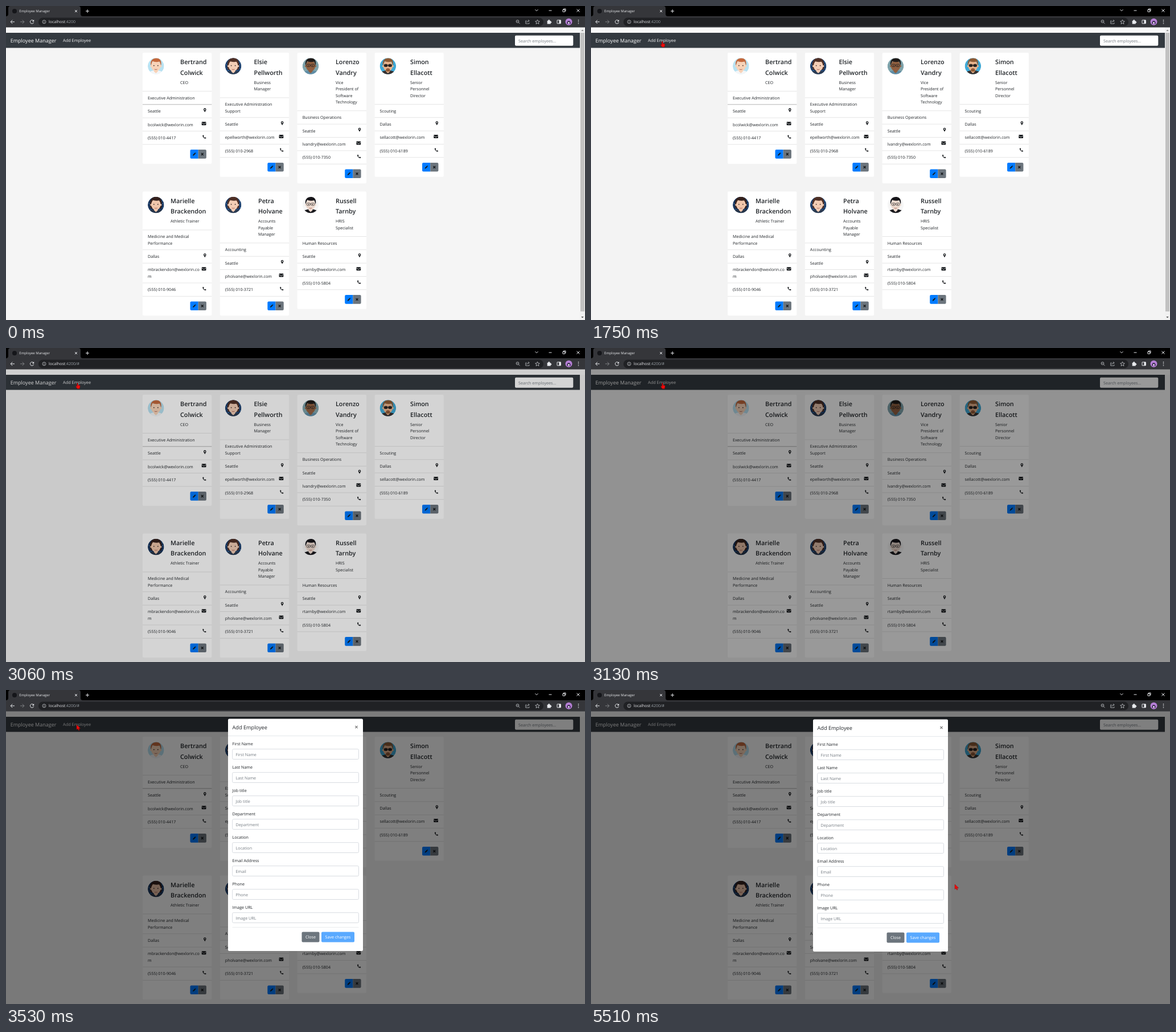
Recreate the animation shown at these times as an HTML page. Size 1017 px wide and 551 px high, loop 6.33 s.

```html
<!DOCTYPE html>
<html lang="en">
<head>
<meta charset="utf-8">
<title>Employee Manager</title>
<style>
  html, body { margin: 0; width: 100%; height: 100%; overflow: hidden; background: #f3f3f3; }
  svg { display: block; width: 1017px; height: 551px; }
  text { font: 400 7.17px "Open Sans", "Noto Sans", sans-serif; fill: #212529; text-rendering: geometricPrecision; white-space: pre; }
  text.name { font-size: 10.8px; font-weight: 600; }
  text.title { font-size: 9.2px; font-weight: 500; }
  text.brand { font-size: 9px; fill: #fff; }
  text.nav { font-size: 7.35px; fill: #f4f4f5; }
  text.hint { fill: #757c83; }
  text.btn { fill: #fff; text-anchor: middle; }
  text.tab { font-size: 6px; fill: #e8eaed; }
  text.url { font-size: 6.97px; fill: #e8eaed; }
  .dim { fill: #9aa0a6; }
  .line { fill: none; stroke: #e8eaed; stroke-width: 1; }
  .thin { stroke: #c4c7cb; stroke-width: .8; }
</style>
</head>
<body>
<svg id="stage" viewBox="0 0 1017 551"></svg>
<script>
const LOOP = 6330;

const rect = (x, y, w, h, fill, r = 0, more = '') =>
  `<rect x="${x}" y="${y}" width="${w}" height="${h}" fill="${fill}" rx="${r}" ${more}/>`;
const text = (x, y, s, cls = '') => `<text x="${x}" y="${y}" class="${cls}">${s}</text>`;
const path = (d, fill, more = '') => `<path d="${d}" fill="${fill}" ${more}/>`;
const line = (d, cls = '', more = '') => `<path class="line ${cls}" d="${d}" ${more}/>`;
const dot = (x, y, r, fill) => `<circle cx="${x}" cy="${y}" r="${r}" fill="${fill}"/>`;
const ring = (x, y, r) => `<circle class="line thin" cx="${x}" cy="${y}" r="${r}"/>`;
const group = (x, y, body, id = '') => `<g ${id && `id="${id}"`} transform="translate(${x} ${y})">${body}</g>`;

// Avatars, centred on 0,0 with radius 14.3
const looks = {
  red: { bg: '#b8e2f2', skin: '#f8d3b8', hair: '#c4683c', shirt: '#f4f6f8' },
  star: { bg: '#1d3f6c', skin: '#f3cdb5', hair: '#4f3026', shirt: '#2b3b52', long: 1, stars: 1 },
  night: { bg: '#17345c', skin: '#f0c6ab', hair: '#35211d', shirt: '#26354a', long: 1, stars: 1 },
  glasses: { bg: '#7ea3ab', skin: '#8f5f3f', hair: '#1f1a18', shirt: '#5f8da6', rim: '#222' },
  shades: { bg: '#3fa9d6', skin: '#e9b48d', hair: '#8d5a34', shirt: '#35302f', rim: '#26211f', lens: '#26211f', beard: 1 },
  dark: { bg: '#f6f6f6', skin: '#eedbd0', hair: '#17161a', shirt: '#1b1b1f', rim: '#333' }
};

function avatar(kind) {
  const a = looks[kind];
  let back = dot(0, 0, 14.3, a.bg), s = '';
  if (a.stars) for (let i = 0; i < 16; i++) {
    const ang = i * 2.4, r = 10.5 + (i % 3) * 1.4;
    back += dot((Math.cos(ang) * r).toFixed(1), (Math.sin(ang) * r).toFixed(1), .7, '#4d94d1');
  }
  if (a.long) s += path('M-7.6 5C-9.4-3-8.4-11 0-11.5 8.4-11 9.4-3 7.6 5Z', a.hair);
  s += path('M-12 10C-8 6.8-4 6.5-3 6H3C4 6.5 8 6.8 12 10V13H-12Z', a.shirt);
  s += path('M-2.7 4H2.7V7.5L0 10-2.7 7.5Z', a.skin);
  s += `<ellipse cx="0" cy="-.5" rx="6.6" ry="7.8" fill="${a.skin}"/>`;
  s += dot(-6.7, 0, 1.4, a.skin) + dot(6.7, 0, 1.4, a.skin);
  s += path('M-7.2-1C-8.5-8-4-11.5 1-11.2 6-11 8.3-7 7.2-1 6-3 6.2-5 5-6.4 1-5.4-3-6-4.6-7-6-5-6-3-7.2-1Z', a.hair);
  if (a.beard) s += path('M-2.8 5.2Q-2.8 3 0 3T2.8 5.2V7Q0 8.6-2.8 7Z', a.hair);
  if (a.rim) {
    for (const x of [-5.4, .6]) s += rect(x, -2.6, 4.8, 3.4, a.lens || 'none', 1.3, `stroke="${a.rim}" stroke-width=".6"`);
    s += path('M-.6-1.5H.6', 'none', `stroke="${a.rim}" stroke-width=".6"`);
  }
  if (!a.lens) s += dot(-2.8, -.8, .7, '#2a2222') + dot(2.8, -.8, .7, '#2a2222');
  s += path('M-1.9 4.4Q0 5.4 1.9 4.4', 'none', 'stroke="#a4584c" stroke-width=".7"');
  return `<g clip-path="url(#round)">${back}<g transform="scale(1.25)">${s}</g></g>`;
}

const INK = '#16191c';
const pin = path('M0 3.7C-.6 1.7-2.3.6-2.3-1.2A2.3 2.3 0 0 1 2.3-1.2C2.3.6.6 1.7 0 3.7ZM0-2.2A1 1 0 1 0 .01-2.2Z', INK, 'fill-rule="evenodd"');
const mail = rect(-3.9, -3, 7.8, 6, INK, .8) + path('M-3.9-1.5L0 1.1 3.9-1.5', 'none', 'stroke="#fff" stroke-width=".7"');
const phone = path('M-3-2.6L-1.6-3.2-.6-1-1.5-.2C-1 .8-.5 1.2.3 1.6L1.1.7 3.2 1.6 2.7 3C-.5 3.4-3.3.5-3 -2.6Z', INK);
const pencil = path('M-2.7 2.7L-2.2.8 1-2.4 2.4-1-.8 2.2ZM1.3-2.7L1.8-3.1 3.1-1.8 2.7-1.3Z', INK);
const cross = path('M-1.9-1.9L1.9 1.9M1.9-1.9L-1.9 1.9', 'none', `stroke="${INK}" stroke-width="1.4"`);
const buttons =
  path('M14.2 0H2Q0 0 0 2V13.6Q0 15.6 2 15.6H14.2Z', '#007bff') +
  path('M14.2 0H26.4Q28.4 0 28.4 2V13.6Q28.4 15.6 26.4 15.6H14.2Z', '#6c757d') +
  group(7.2, 7.9, pencil) + group(21.3, 7.9, cross);

function card(col, top, look, name, nameX, job, dept, city, email, tel) {
  const x = 240 + col * 135.85, step = 11.45, w = 121.3;
  let y = top + 56.05 + job.length * step, s = '';
  const rule = (c = '#dfdfdf') => s += rect(0, y - .4, w, .8, c);
  const row = (lines, icon = '', iconX = 0) => {
    lines.forEach((t, i) => s += text(9, y + 14.3 + i * step, t));
    if (icon) s += group(iconX, y + 10, icon);
    y += 23.35 + (lines.length - 1) * step;
    rule();
  };
  s += group(23.3, top + 23.5, avatar(look));
  name.forEach((t, i) => s += text(nameX - x, top + 20.2 + i * 18.5, t, 'name'));
  job.forEach((t, i) => s += text(nameX - x, top + 54.7 + i * step, t));
  rule();
  row(dept);
  if (look === 'red') rule('#b4b4b4');
  row([city], pin, 109.3);
  row(email, mail, 107.6);
  row([tel], phone, 108.4);
  s += group(83.5, y + 9.2, buttons);
  return group(x, 0, rect(0, top, w, y + 34 - top, '#fff', 2) + s);
}

const mailTo = user => [user + '@wexlorin.com'];
const R1 = 82, R2 = 325.5;
const cards = [
  [0, R1, 'red', ['Bertrand', 'Colwick'], 306, ['CEO'], ['Executive Administration'], 'Seattle', mailTo('bcolwick'), '(555) 010-4417'],
  [1, R1, 'star', ['Elsie', 'Pellworth'], 435.5, ['Business', 'Manager'], ['Executive Administration', 'Support'], 'Seattle', mailTo('epellworth'), '(555) 010-2968'],
  [2, R1, 'glasses', ['Lorenzo', 'Vandry'], 579, ['Vice', 'President of', 'Software', 'Technology'], ['Business Operations'], 'Seattle', mailTo('lvandry'), '(555) 010-7350'],
  [3, R1, 'shades', ['Simon', 'Ellacott'], 710, ['Senior', 'Personnel', 'Director'], ['Scouting'], 'Dallas', mailTo('sellacott'), '(555) 010-6189'],
  [0, R2, 'night', ['Marielle', 'Brackendon'], 289, ['Athletic Trainer'], ['Medicine and Medical', 'Performance'], 'Dallas', ['mbrackendon@wexlorin.co', 'm'], '(555) 010-9046'],
  [1, R2, 'star', ['Petra', 'Holvane'], 443, ['Accounts', 'Payable', 'Manager'], ['Accounting'], 'Seattle', mailTo('pholvane'), '(555) 010-3721'],
  [2, R2, 'dark', ['Russell', 'Tarnby'], 579, ['HRIS', 'Specialist'], ['Human Resources'], 'Seattle', mailTo('rtarnby'), '(555) 010-5804']
];

const page =
  `<clipPath id="round">${dot(0, 0, 14.3, '#000')}</clipPath>` +
  rect(0, 37, 1017, 514, '#f3f3f3', 0, 'id="bg"') +
  rect(0, 37, 1017, 10, '#f9f9f9') +
  rect(0, 47, 1008, 26.5, '#343a40') +
  text(7.7, 64, 'Employee Manager', 'brand') +
  text(100, 63.2, 'Add Employee', 'nav') +
  rect(894, 51.8, 102.3, 18, '#fff', 2) +
  text(900, 63.8, 'Search employees...', 'hint') +
  cards.map(c => card(...c)).join('') +
  `<g id="scroll">${rect(1008, 37, 9, 514, '#f1f1f1')}${rect(1009, 47, 7, 489, '#c1c1c1')}` +
  path('M1010.3 44L1012.5 41.5 1014.7 44Z', '#8a8a8a') + path('M1010.3 545L1012.5 547.5 1014.7 545Z', '#505050') + '</g>' +
  rect(0, 37, 1017, 514, '#000', 0, 'id="shade" opacity="0"');

// Dialog, drawn from its own top edge
const fields = ['First Name', 'Last Name', 'Job title', 'Department', 'Location', 'Email Address', 'Phone', 'Image URL'];
const dialog =
  rect(390, 0, 237, 407.5, '#fff', 2.2) +
  text(397.5, 18.2, 'Add Employee', 'title') +
  path('M613.4 12.4L617.6 16.6M617.6 12.4L613.4 16.6', 'none', 'stroke="#777" stroke-width="1.3"') +
  rect(390, 29.6, 237, .8, '#dee2e6') +
  fields.map((f, i) => {
    const y = i * 41;
    return text(397.5, 46.1 + y, f) +
      rect(397.7, 53.2 + y, 221.8, 17.8, '#fff', 2, 'stroke="#ced4da" stroke-width=".8"') +
      text(403.6, 65.2 + y, f === 'Email Address' ? 'Email' : f, 'hint');
  }).join('') +
  rect(397.5, 365.4, 222, .8, '#e4e7ea') +
  rect(519.5, 374, 31, 18, '#6c757d', 2) + text(535, 385.7, 'Close', 'btn') +
  rect(554, 374, 58, 18, '#59a9ff', 2) + text(583, 385.7, 'Save changes', 'btn');

const browser =
  rect(0, 0, 1017, 18, '#000') + rect(0, 18, 1017, 19.5, '#35363a') +
  path('M0 18Q4 18 4 14V4Q4 0 8 0H127Q131 0 131 4V14Q131 18 135 18Z', '#35363a') +
  dot(15, 9, 4, '#15161a') +
  text(23.3, 11.2, 'Employee Manager', 'tab') +
  line('M121 7L125 11M125 7L121 11') + line('M140 9H146M143 6V12') +
  line('M929.5 6.2L932 8.7 934.5 6.2') + line('M953.5 8H958.5') +
  line('M978 6.5H981.7V10.2H978ZM979.3 6.2V5H983V8.8H982') +
  line('M1002.5 5.5L1007.5 10.5M1007.5 5.5L1002.5 10.5') +
  line('M15 27.8H8.3M11.3 24.6L8.1 27.8 11.3 31') +
  line('M25 27.8H31.7M28.7 24.6L31.9 27.8 28.7 31', '', 'opacity=".4"') +
  line('M48.3 26A3.2 3.2 0 1 0 48.7 28.7') + path('M49.2 24V27.3H45.9Z', '#e8eaed') +
  rect(57, 20.5, 887, 15, '#202124', 7.5) +
  ring(67, 27.8, 3) + line('M67 27.2V29.6M67 25.8V26.6', 'thin') +
  text(75, 30.4, 'localhost<tspan class="dim">:4200<tspan id="hash">/#</tspan></tspan>', 'url') +
  ring(898.5, 27, 2.4) + line('M900.3 28.9L902.6 31.2M897.4 27H899.6', 'thin') +
  line('M914.5 26H912.8V31H919V29.2M914.8 29C915 27 916.5 26 918.8 26M917.3 24.2L919.2 26 917.3 27.8', 'thin') +
  line('M933.5 24L934.6 26.7 937.4 26.9 935.2 28.7 936 31.5 933.5 30 931 31.5 931.8 28.7 929.6 26.9 932.4 26.7Z', 'thin') +
  rect(950.7, 25.7, 6, 5.8, '#e8eaed', .6) + dot(953.7, 25.3, 1.3, '#e8eaed') + dot(957, 28.5, 1.3, '#e8eaed') +
  rect(968, 24.8, 6.4, 6, 'none', .4, 'stroke="#e8eaed"') + rect(971.4, 24.8, 3, 6, '#e8eaed') +
  dot(988.5, 27.8, 6, '#b67fd6') + path('M985.2 31.2Q985.2 26 988.5 26T991.8 31.2Z', '#3b2a52') + dot(988.5, 29.4, 1.5, '#efe4f6') +
  [24.9, 27.8, 30.7].map(y => dot(1005.5, y, .8, '#e8eaed')).join('');

const RED = '#f00a0a', edge = 'stroke="#7a0000" stroke-width=".35"';
const cursor =
  path('M0 0V8.6L2.1 6.9 3.7 10 5.1 9.3 3.7 6.4H6.8Z', RED, `id="arrow" ${edge}`) +
  path('M2.4 1.2Q3.2.2 4 1.2V4.2L7.2 5Q8 5.4 7.8 6.6L7 10.6H2.8L.6 7.2Q.1 6 1.2 5.8L2.4 6.6Z', RED, `id="hand" ${edge}`);

const $ = id => document.getElementById(id);
$('stage').innerHTML = page + group(0, 0, dialog, 'dialog') + browser + group(0, 0, cursor, 'cursor');

// time, opacity
const shadeSteps = [[0, 0], [3060, .17], [3130, .4], [3190, .5]];
// time, top, opacity
const dialogSteps = [[0, 27, 0], [3280, 29, .35], [3360, 37, .85], [3530, 50.5, 1], [3580, 51, 1], [3660, 51.5, 1]];
// time, x, y, shape
const cursorSteps = [
  [0, 0, 0, ''], [850, 320, 457, 'arrow'], [920, 232, 306, 'arrow'], [1060, 181, 247, 'arrow'],
  [1210, 155, 165, 'arrow'], [1280, 140, 116, 'arrow'], [1420, 136, 101, 'arrow'], [1500, 131, 84, 'arrow'],
  [1590, 126, 72, 'arrow'], [1670, 123, 63, 'hand'], [1750, 122, 61.5, 'hand'], [3060, 122.3, 60.8, 'hand'],
  [3530, 124, 61, 'arrow'], [3660, 129, 61, 'arrow'], [3830, 137, 61, 'arrow'], [3970, 153, 64, 'arrow'],
  [4350, 177, 67, 'arrow'], [4700, 240, 98, 'arrow'], [4800, 410, 192, 'arrow'], [4890, 559, 268, 'arrow'],
  [5040, 604, 308, 'arrow'], [5100, 633, 334, 'arrow'], [5250, 638.3, 341, 'arrow'], [5510, 639, 341, 'arrow']
];
const at = (steps, t) => steps.findLast(s => s[0] <= t);
const show = (id, on) => $(id).style.display = on ? '' : 'none';

const start = performance.now();
function draw() {
  const t = (performance.now() - start) % LOOP;
  const [, top, alpha] = at(dialogSteps, t);
  const [, x, y, shape] = at(cursorSteps, t);
  $('bg').setAttribute('fill', t < 240 ? '#f5f5f5' : '#f3f3f3');
  $('shade').setAttribute('opacity', at(shadeSteps, t)[1]);
  $('dialog').setAttribute('transform', `translate(0 ${top})`);
  $('dialog').setAttribute('opacity', alpha);
  $('cursor').setAttribute('transform', `translate(${x} ${y})`);
  show('arrow', shape === 'arrow');
  show('hand', shape === 'hand');
  show('hash', t >= 2970);
  show('scroll', t < 3060);
  requestAnimationFrame(draw);
}
draw();
</script>
</body>
</html>
```
